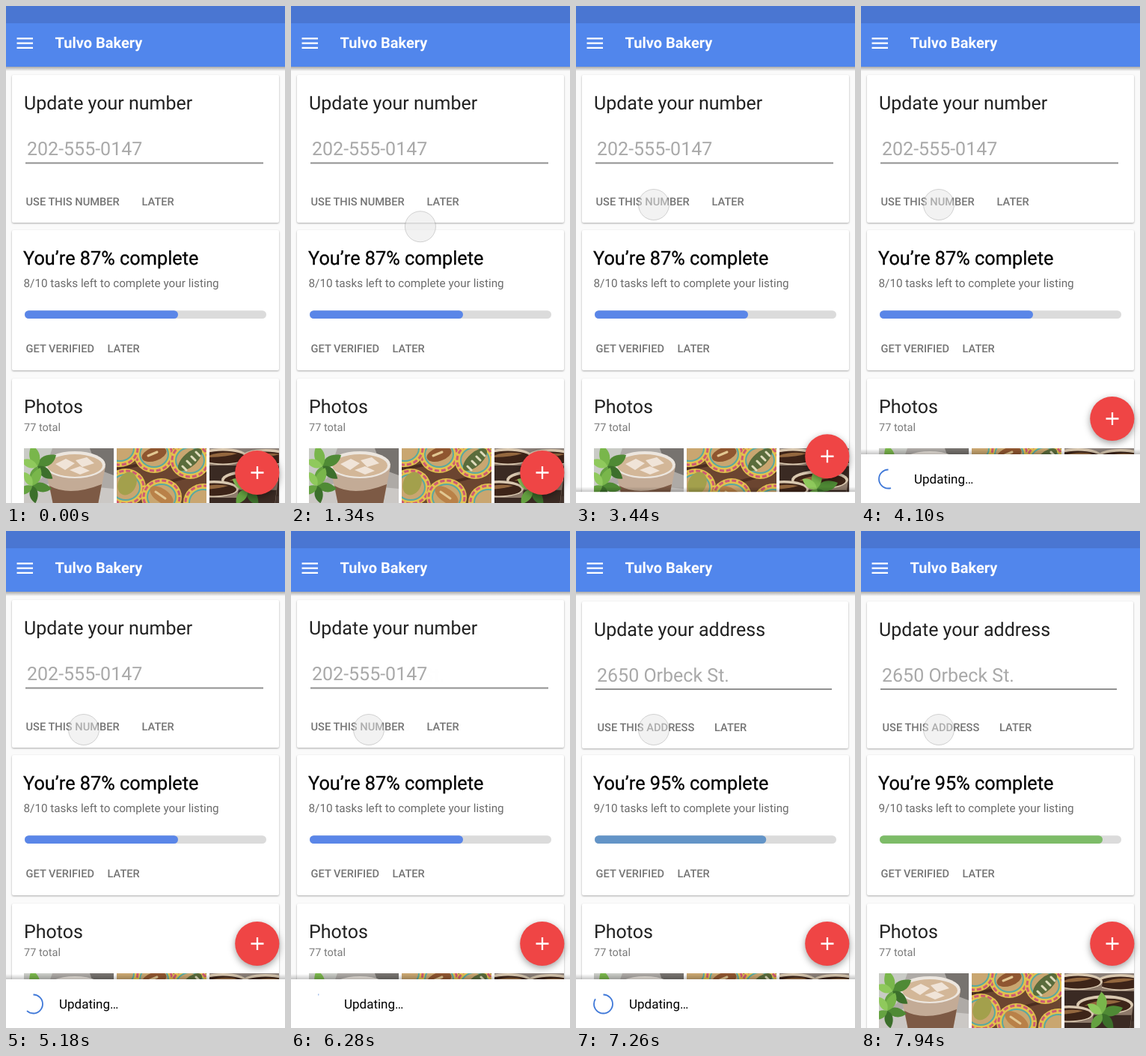
Write an HTML page that moves like this. It is 373 px wide and 663 px high and loops after 8 s.

```html
<!DOCTYPE html>
<html lang="en">
<head>
<meta charset="utf-8">
<title>Listing update</title>
<style>
html, body { margin: 0; width: 100%; height: 100%; overflow: hidden; background: #fafafa; }
svg { display: block; width: 373px; height: 663px; font-family: Roboto, "Liberation Sans", sans-serif; text-rendering: geometricPrecision; }
.head { font-size: 25px; fill: #212121; }
.strong { font-size: 25.3px; fill: #000; stroke: #000; stroke-width: .3; }
.field { font-size: 25px; fill: #a9a9a9; }
.sub { font-size: 15.28px; fill: #6c6c6c; }
.small { font-size: 14.5px; fill: #7b7b7b; }
.btn { font-size: 14.65px; font-weight: 500; fill: #757575; }
.card { fill: #fff; filter: drop-shadow(0 1px 1px rgba(0,0,0,.32)); }
.fab { filter: drop-shadow(0 3px 5px rgba(0,0,0,.38)); }
.line { stroke: #919191; stroke-width: 2; }
</style>
</head>
<body>
<svg viewBox="0 0 373 663">
  <defs>
    <path id="leaf" d="M0 0C1-11 10-17 25-15C23-4 13 4 0 0Z"/>
    <g id="mint">
      <use href="#leaf" fill="#4f8a35"/>
      <use href="#leaf" fill="#79b64b" transform="rotate(-75)"/>
      <use href="#leaf" fill="#8fc95c" transform="rotate(-130) scale(.8)"/>
      <use href="#leaf" fill="#3c6f2b" transform="rotate(70) scale(.9)"/>
      <use href="#leaf" fill="#65a241" transform="rotate(140) scale(.85)"/>
    </g>
    <g id="cup">
      <path d="M-33 0L-26 52H26L33 0Z" fill="#8d7a6b"/>
      <path d="M-31 12L-26 52H26L31 12Z" fill="#3a2a23"/>
      <ellipse rx="33" ry="11" fill="#d9c8b0"/>
      <ellipse cy="1" rx="30" ry="8.5" fill="#3d2418"/>
      <path d="M-24 1Q-6-8 19-4Q4 1-24 1" fill="#94683f"/>
    </g>
    <g id="plate">
      <ellipse rx="27" ry="25" fill="#e2c14f"/>
      <ellipse rx="24" ry="22" fill="none" stroke="#cf5a72" stroke-width="3" stroke-dasharray="6 3"/>
      <ellipse rx="20" ry="18" fill="#5aa9a0"/>
      <ellipse rx="18" ry="16" fill="#c9a670"/>
    </g>
    <clipPath id="p1"><path d="M24 590H144V663H24Z"/></clipPath>
    <clipPath id="p2"><path d="M148 590H268V663H148Z"/></clipPath>
    <clipPath id="p3"><path d="M272 590H365V663H272Z"/></clipPath>
    <linearGradient id="drop" x2="0" y2="1">
      <stop stop-opacity=".32"/><stop offset="1" stop-opacity="0"/>
    </linearGradient>
    <linearGradient id="rise" x2="0" y2="1">
      <stop stop-opacity="0"/><stop offset="1" stop-opacity=".22"/>
    </linearGradient>
  </defs>

  <path d="M0 0H373V663H0Z" fill="#fafafa"/>
  <rect y="81" width="373" height="6" fill="url(#drop)"/>
  <path d="M0 23H373V81H0Z" fill="#5186ec"/>
  <path d="M0 0H373V23H0Z" fill="#4a76d2"/>
  <path d="M14.5 43.3H36M14.5 49.6H36M14.5 55.9H36" stroke="#fff" stroke-width="2.2"/>
  <text x="65.5" y="56" font-size="20" font-weight="700" fill="#fff">Tulvo Bakery</text>

  <rect class="card" x="8" y="92" width="357" height="197" rx="2"/>
  <text class="head" x="24" y="138">Update your number</text>
  <text class="field" x="28" y="199">202-555-0147</text>
  <path class="line" d="M26 209.5H344"/>
  <text class="btn" x="26.5" y="265.5">USE THIS NUMBER</text>
  <text class="btn" x="181.5" y="265.5">LATER</text>
  <rect id="press" x="8" y="234" width="159" height="55" rx="2" fill-opacity=".085"/>

  <g id="address">
    <path d="M4 88H370V296H4Z" fill="#fafafa"/>
    <rect class="card" x="8" y="94" width="356" height="196" rx="2"/>
    <text class="head" x="24" y="140">Update your address</text>
    <text class="field" x="28" y="201">2650 Orbeck St.</text>
    <path class="line" d="M26 211H342"/>
    <text class="btn" x="28.5" y="266.5">USE THIS ADDRESS</text>
    <text class="btn" x="185" y="266.5">LATER</text>
  </g>

  <rect class="card" x="8" y="299" width="357" height="187" rx="2"/>
  <text class="head strong" x="23" y="345">You’re 87% complete</text>
  <text class="sub" x="23.5" y="375">8/10 tasks left to complete your listing</text>
  <g id="score">
    <path d="M20 315H300V382H20Z" fill="#fff"/>
    <text class="head strong" x="23" y="345">You’re 95% complete</text>
    <text class="sub" x="23.5" y="375">9/10 tasks left to complete your listing</text>
  </g>
  <rect x="25" y="406.3" width="323" height="10.7" rx="5.35" fill="#dbdbdb"/>
  <rect id="bar" x="25" y="406.3" height="10.7" rx="5.35"/>
  <text class="btn" x="26.5" y="462">GET VERIFIED</text>
  <text class="btn" x="135.5" y="462">LATER</text>

  <rect class="card" x="8" y="497" width="357" height="180" rx="2"/>
  <text class="head" x="24" y="543">Photos</text>
  <text class="small" x="24" y="567">77 total</text>

  <g clip-path="url(#p1)">
    <path d="M24 590H144V663H24Z" fill="#aeaaa6"/>
    <path d="M24 590H62L48 630L24 645Z" fill="#c9cbc6"/>
    <path d="M112 590H144V626L122 618Z" fill="#77736f"/>
    <path d="M24 650L60 636L144 644V663H24Z" fill="#cbc8c5"/>
    <path d="M52 614L64 670H122L133 614Z" fill="#c3ab96"/>
    <path d="M58 640Q85 655 128 638L122 670H64Z" fill="#7d5a45"/>
    <ellipse cx="92" cy="612" rx="41" ry="18" fill="#ece6df"/>
    <ellipse cx="92" cy="613" rx="37" ry="15" fill="#d3b798"/>
    <path d="M66 611l14-7 12 6-13 9ZM93 606l15-4 10 8-16 5ZM85 619l14-5 13 6-13 5Z" fill="#f0e4d8"/>
    <use href="#mint" x="42" y="614"/>
    <use href="#mint" transform="translate(35 640) rotate(40) scale(.9)"/>
  </g>

  <g clip-path="url(#p2)">
    <path d="M148 590H268V663H148Z" fill="#6b4530"/>
    <path d="M148 618L268 594M148 652L268 622" stroke="#4d2e20" stroke-width="4"/>
    <use href="#plate" x="160" y="642"/>
    <use href="#plate" x="198" y="598"/>
    <use href="#plate" x="208" y="655"/>
    <use href="#plate" x="246" y="606"/>
    <use href="#plate" x="264" y="662"/>
    <use href="#plate" x="152" y="590"/>
    <g stroke-width="3" stroke-linecap="round">
      <ellipse cx="162" cy="637" rx="12" ry="16" fill="#a3a04c" transform="rotate(25 162 637)"/>
      <ellipse cx="198" cy="598" rx="17" ry="9" fill="#8f5630" transform="rotate(-18 198 598)"/>
      <ellipse cx="208" cy="653" rx="18" ry="9" fill="#b98148" transform="rotate(35 208 653)"/>
      <ellipse cx="246" cy="605" rx="20" ry="9" fill="#5a6c3c" transform="rotate(-42 246 605)"/>
      <path d="M236 614l5 5M242 607l5 5M248 601l5 5M254 595l5 5" stroke="#e0dcbc"/>
      <path d="M190 600l12-5M200 648l13 9" stroke="#e2c792"/>
    </g>
  </g>

  <g clip-path="url(#p3)">
    <path d="M272 590H365V663H272Z" fill="#43342d"/>
    <path d="M272 590H365V598H272Z" fill="#8b8079"/>
    <use href="#cup" x="347" y="602"/>
    <use href="#cup" x="290" y="601"/>
    <use href="#cup" transform="translate(326 632) scale(1.15)"/>
    <use href="#cup" x="278" y="644"/>
    <use href="#mint" transform="translate(322 644) rotate(15)"/>
  </g>

  <g id="fab">
    <circle class="fab" cx="335.8" cy="622.5" r="29.6" fill="#ef4545"/>
    <path d="M327.5 622.5H344.5M336 614V631" stroke="#fff" stroke-width="2.3"/>
  </g>

  <g id="snack">
    <rect y="591" width="373" height="7" fill="url(#rise)"/>
    <path d="M0 598H373V680H0Z" fill="#fff"/>
    <path id="spin" d="M36.5 618.5a12.5 12.5 0 0 1 0 25a12.5 12.5 0 0 1 0-25" fill="none" stroke="#3f78d8" stroke-width="1.8" pathLength="360"/>
    <text x="71" y="637" font-size="17">Updating…</text>
  </g>

  <path id="route" d="M194 540Q263 289 104 265" fill="none"/>
  <circle id="touch" r="20.5" fill="#e6e6e6" fill-opacity=".5" stroke="#000" stroke-opacity=".16"/>
</svg>
<script>
const el = id => document.getElementById(id);
const set = (id, attrs) => { for (const k in attrs) el(id).setAttribute(k, attrs[k]); };
const ramp = (t, a, b) => Math.min(1, Math.max(0, (t - a) / (b - a)));
const ease = (t, a, b) => { const x = ramp(t, a, b); return x * x * (3 - 2 * x); };
const mix = (a, b, k) => a + (b - a) * k;
const blue = [90, 134, 232], green = [125, 188, 104];
const routeLength = el("route").getTotalLength();
const GROW = 1180, SHRINK = 640, TURN = GROW + SHRINK;

function draw(t) {
  const spot = el("route").getPointAtLength(routeLength * ease(t, 760, 1600));
  set("touch", { cx: spot.x, cy: spot.y, opacity: ramp(t, 440, 620) });
  set("press", { opacity: t < 2840 ? ease(t, 1580, 2280) : 0 });

  const up = ease(t, 3120, 4000), down = ease(t, 7300, 7940);
  set("fab", { transform: `translate(0 ${-72 * up})` });
  set("snack", { transform: `translate(0 ${72 * (1 - up + down)})` });

  // The arc grows clockwise from the top, then its tail catches up.
  const turn = (t - 6270 + 4 * TURN) % TURN;
  const head = 360 * ramp(turn, 0, GROW), tail = 360 * ramp(turn, GROW, TURN);
  set("spin", { "stroke-dasharray": `0 ${tail} ${head - tail} 720` });

  const swap = ease(t, 6260, 7000);
  set("address", { opacity: swap });
  set("score", { opacity: swap });
  const fill = ease(t, 7000, 7780);
  set("bar", {
    width: mix(205, 298, fill),
    fill: `rgb(${blue.map((c, i) => Math.round(mix(c, green[i], fill)))})`
  });
}

const start = performance.now();
function frame() {
  draw((performance.now() - start) % 8000);
  requestAnimationFrame(frame);
}
frame();
</script>
</body>
</html>
```
